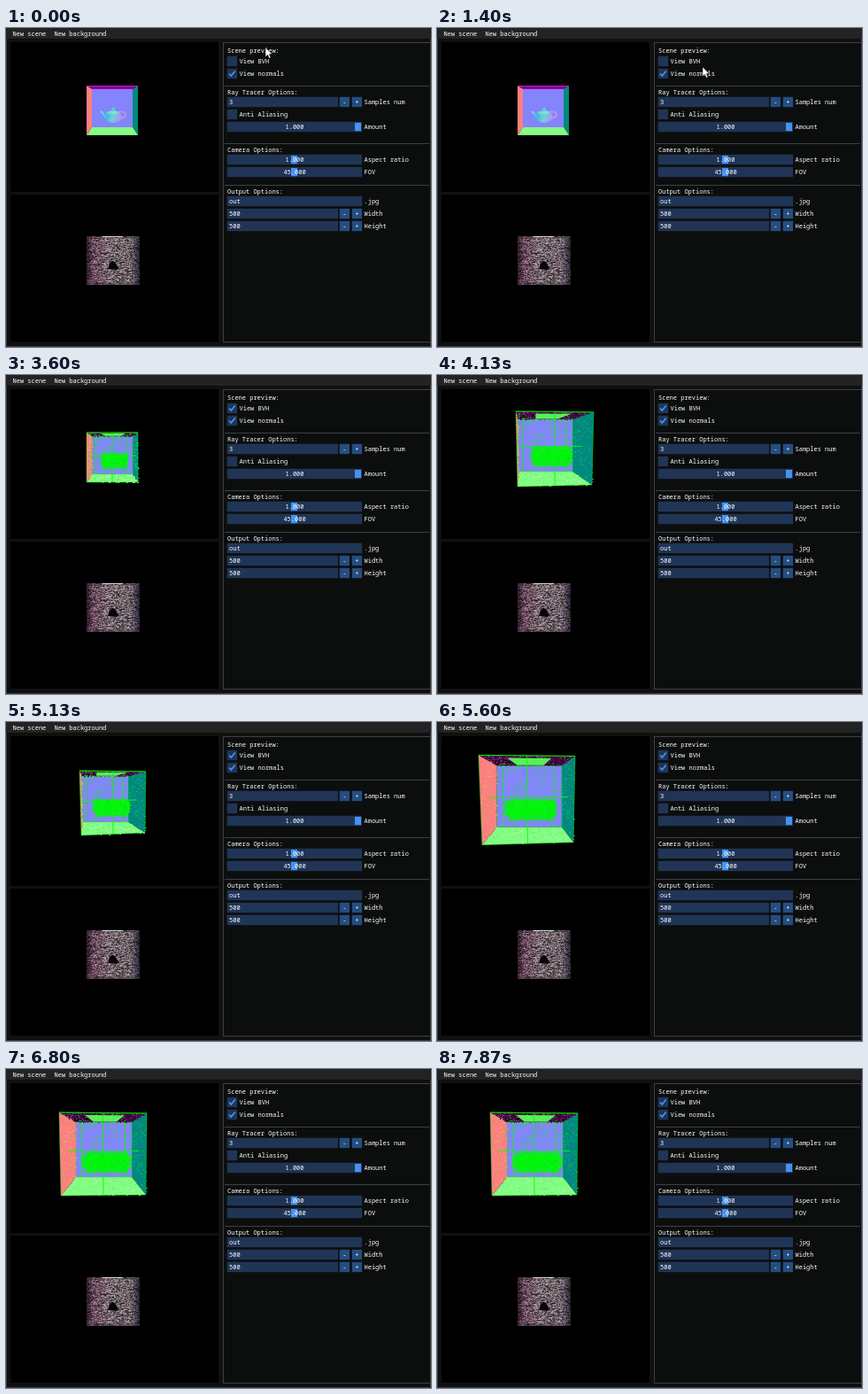
Write an HTML page with a canvas that moves like this. It is 480 by 360 pixels and loops after 8000 ms.

```html
<!DOCTYPE html>
<html>
<head>
<meta charset="utf-8">
<style>
  html, body { margin: 0; width: 100%; height: 100%; overflow: hidden; background: #0f0f0f; }
  canvas, svg { position: absolute; left: 0; top: 0; display: block; }
  text { font: 500 7px "Noto Sans Mono", "DejaVu Sans Mono", monospace; fill: #fff; white-space: pre; }
  .tick { fill: none; stroke: #4296fa; stroke-width: 1.7; }
</style>
</head>
<body>
<canvas id="view" width="480" height="360"></canvas>
<svg id="ui" width="480" height="360" viewBox="0 0 480 360"></svg>
<script>
const LOOP = 8000;
const FIELD = '#203556', BUTTON = '#254d80', GRAB = '#4492f2', ACTIVE = '#3a6fb8', BORDER = '#3e3e46';
const GREEN = '#00ff00';
const ui = document.getElementById('ui');
const ctx = document.getElementById('view').getContext('2d');

// ---------- interface ----------
function add(tag, attrs, content = '') {
  const el = document.createElementNS('http://www.w3.org/2000/svg', tag);
  for (const key in attrs) el.setAttribute(key, attrs[key]);
  el.textContent = content;
  return ui.appendChild(el);
}
const box = (x, y, width, height, fill) => add('rect', { x, y, width, height, fill });
const frame = (x, y, width, height, fill) =>
  add('rect', { x: x + .5, y: y + .5, width: width - 1, height: height - 1, fill, stroke: BORDER });
const field = (x, y, width, fill = FIELD) => box(x - .3, y - .2, width + .4, 11.4, fill);
const label = (x, y, content) => add('text', { x, y }, content);
const tick = y => add('path', { d: `M252 ${y + 5.5}L254.3 ${y + 8}L258.7 ${y + 2.5}`, class: 'tick' });
const separator = y => box(247, y, 231, 1, BORDER);

function checkbox(y, name) {
  label(263.5, y + 8, name);
  return field(250, y, 11);
}
function stepper(y, value, name) {
  field(250, y, 125);
  label(252, y + 8, value);
  [[377, '-'], [391, '+']].forEach(([x, sign]) => {
    field(x, y, 11, BUTTON);
    label(x + 3.2, y + 8, sign);
  });
  label(404.5, y + 8, name);
}
function slider(y, value, name, grabX) {
  field(250, y, 152);
  box(grabX, y + 1, 7, 9.2, GRAB);
  label(326 - value.length * 2.1, y + 8, value);
  label(404.5, y + 8, name);
}

frame(0, 0, 480, 360, 'none');
box(0, 0, 480, 12, '#232323');
label(7.5, 8.5, 'New scene');
label(54.5, 8.5, 'New background');
frame(245, 16, 235, 339, '#0c0e0e');

label(250, 28, 'Scene preview:');
const bvhBox = checkbox(32, 'View BVH');
const bvhTick = tick(32);
checkbox(46, 'View normals');
tick(46);
separator(65);
label(250, 75, 'Ray Tracer Options:');
stepper(78, '3', 'Samples num');
checkbox(92, 'Anti Aliasing');
slider(106, '1.000', 'Amount', 394);
separator(130);
label(250, 139.5, 'Camera Options:');
slider(143, '1.000', 'Aspect ratio', 322);
slider(157, '45.000', 'FOV', 322);
separator(177);
label(250, 186.5, 'Output Options:');
field(250, 190, 152);
label(252, 198, 'out');
label(404.5, 198, '.jpg');
stepper(204, '500', 'Width');
stepper(218, '500', 'Height');
const cursor = add('path', {
  d: 'M0 0V10.5L2.5 8.3L4.3 12.2L6 11.4L4.3 7.6H7.7Z',
  fill: '#fff', stroke: '#111', 'stroke-width': .5
});

// ---------- helpers ----------
function random(seed) {
  return () => {
    seed = seed + 0x6D2B79F5 | 0;
    let n = Math.imul(seed ^ seed >>> 15, 1 | seed);
    n = n + Math.imul(n ^ n >>> 7, 61 | n) ^ n;
    return ((n ^ n >>> 14) >>> 0) / 4294967296;
  };
}
// Rows are [time, ...values]
function sample(rows, t) {
  let i = 0;
  while (i < rows.length - 2 && t >= rows[i + 1][0]) i++;
  const [a, b] = [rows[i], rows[i + 1]];
  const p = Math.min(1, Math.max(0, (t - a[0]) / (b[0] - a[0])));
  const eased = p * p * (3 - 2 * p);
  return a.slice(1).map((v, k) => v + (b[k + 1] - v) * eased);
}
function fill(points, color) {
  ctx.fillStyle = color;
  ctx.beginPath();
  points.forEach(([x, y]) => ctx.lineTo(x, y));
  ctx.closePath();
  ctx.fill();
}
function line(a, b) {
  ctx.beginPath();
  ctx.moveTo(...a);
  ctx.lineTo(...b);
  ctx.stroke();
}
const mix = (a, b, p) => [a[0] + (b[0] - a[0]) * p, a[1] + (b[1] - a[1]) * p];
const inside = ([a, b, c, d], u, v) => mix(mix(a, b, u), mix(d, c, u), v);

function speckle(quad, count, colors, rnd) {
  for (let i = 0; i < count; i++) {
    const [x, y] = inside(quad, rnd(), rnd());
    ctx.fillStyle = colors[i % colors.length];
    ctx.fillRect(Math.round(x), Math.round(y), 1 + (rnd() > .6), 1);
  }
}

// ---------- grainy render ----------
const render = document.createElement('canvas');
render.width = 60;
render.height = 55;
{
  const g = render.getContext('2d'), rnd = random(11);
  for (let y = 0; y < 55; y++) {
    let grain = rnd();
    for (let x = 0; x < 60; x++) {
      grain = grain * .35 + rnd() * .65;
      const edge = Math.min(1, .45 + Math.min(x, 59 - x, y + 5, 58 - y) / 14);
      const base = (15 + grain * 185) * edge;
      const red = Math.max(0, 1 - x / 26), blue = Math.max(0, (x - 46) / 14);
      const tone = k => Math.max(0, base * k + (rnd() - .5) * 18);
      g.fillStyle = `rgb(${tone(1.04 - blue * .2)},${tone(.92 - red * .25 - blue * .15)},${tone(.98 - red * .08)})`;
      g.fillRect(x, y, 1, 1);
    }
  }
  g.fillStyle = '#ddd';
  g.fillRect(18, 0, 23, 1);
  g.fillStyle = '#050505';
  g.beginPath();
  g.moveTo(24, 37);
  g.lineTo(26, 31);
  g.lineTo(29, 28);
  g.lineTo(32, 29);
  g.lineTo(36, 36);
  g.lineTo(34, 38);
  g.fill();
}

// ---------- preview scene ----------
// time, front corners clockwise from top left, back wall box, teapot bounds
const poses = [
  [3600, 91, 65, 149, 65, 149, 121, 91, 121, 97, 69, 143, 112, 107, 88, 137, 107],
  [4130, 89, 41, 177, 42, 175, 124, 91, 126, 91, 50, 153, 109, 106, 81, 153, 105],
  [5130, 83, 55, 158, 56, 157, 125, 85, 128, 85, 61, 138, 113, 98, 87, 140, 108],
  [5650, 46, 37, 156, 38, 154, 136, 50, 139, 67, 49, 141, 119, 76, 87, 135, 113],
  [6000, 54, 44, 154, 45, 152, 137, 57, 139, 74, 55, 140, 120, 81, 91, 134, 116],
  [6800, 60, 49, 159, 50, 158, 142, 62, 143, 79, 60, 142, 122, 86, 94, 141, 119]
];

function teapot() {
  const shade = ctx.createLinearGradient(108, 94, 135, 103);
  ['#70d8e8', '#40b8e8', '#70d0d8', '#a0a0f0', '#f090d0'].forEach((c, i) => shade.addColorStop(i / 4, c));
  ctx.strokeStyle = ctx.fillStyle = shade;
  ctx.lineWidth = 1.6;
  ctx.beginPath();
  ctx.ellipse(130, 98, 5, 3.6, 0, 0, 7);
  ctx.stroke();
  ctx.beginPath();
  ctx.moveTo(107, 94);
  ctx.quadraticCurveTo(110, 96, 113, 102);
  ctx.lineWidth = 2.4;
  ctx.stroke();
  ctx.beginPath();
  ctx.ellipse(121, 100, 9.5, 7, 0, 0, 7);
  ctx.ellipse(121, 92, 2, 2.4, 0, 0, 7);
  ctx.fill();
  ctx.fillStyle = 'rgba(150,255,170,.45)';
  ctx.beginPath();
  ctx.ellipse(120, 95.5, 6.5, 2, 0, 0, 7);
  ctx.fill();
}

function hierarchy(front, back, sides, bounds) {
  const rnd = random(5), [x0, y0, x1, y1] = bounds;
  const width = x1 - x0, height = y1 - y0;
  const middle = front.map((p, i) => mix(p, back[i], .5));

  speckle(sides.ceiling, 330, ['#000', '#b000a8', '#280028', '#80107c', '#10a010'], rnd);
  speckle(sides.left, 130, ['#f0a060', '#d8b468', '#e08878'], rnd);
  speckle(sides.right, 130, ['#00b868', '#20a080', '#1878a0'], rnd);
  speckle(sides.floor, 130, ['#60ff60', '#a8ffa8', '#70f070'], rnd);
  fill([[.27, .25], [.77, .25], [.72, .95], [.32, .95]].map(([u, v]) => inside(sides.ceiling, u, v)), '#58f058');

  ctx.strokeStyle = GREEN;
  ctx.lineWidth = .8;
  ctx.globalAlpha = .45;
  for (let i = 0; i < 26; i++) {
    const u = rnd(), v = rnd(), run = .1 + rnd() * .3;
    line(inside(back, u, v), inside(back, Math.min(1, u + run * .7), Math.max(0, v - run)));
  }
  ctx.globalAlpha = .85;
  ctx.lineWidth = 1;
  line(inside(middle, 0, .49), inside(middle, 1, .49));
  line(inside(front, .5, 0), inside(front, .5, 1));
  [.1, .88].forEach(u => line(inside(back, u, 0), inside(back, u, 1)));
  line(front[0], front[1]);
  ctx.globalAlpha = .4;
  front.forEach((p, i) => line(p, front[(i + 1) % 4]));
  back.forEach((p, i) => line(p, back[(i + 1) % 4]));

  ctx.globalAlpha = .88;
  ctx.fillStyle = '#00f808';
  ctx.fillRect(x0 + width * .08, y0, width * .86, height * .92);
  ctx.fillRect(x0, y0 + height * .12, width, height * .62);
  ctx.globalAlpha = 1;
  speckle([[x0, y0], [x1, y0], [x1, y1], [x0, y1]], 130, [GREEN, '#08d828', '#00f000', '#30e040'], rnd);
}

function scene(t, bvh) {
  const p = sample(poses, t);
  const front = [0, 2, 4, 6].map(i => [p[i], p[i + 1]]);
  const [l, top, r, b] = p.slice(8, 12);
  const back = [[l, top], [r, top], [r, b], [l, b]];
  const sides = {
    ceiling: [front[0], front[1], back[1], back[0]],
    right: [back[1], front[1], front[2], back[2]],
    floor: [back[3], back[2], front[2], front[3]],
    left: [front[0], back[0], back[3], front[3]]
  };
  fill(back, '#8484fc');
  fill(sides.ceiling, bvh ? '#400040' : '#8a0098');
  fill(sides.right, '#008a7c');
  fill(sides.floor, '#84fc84');
  fill(sides.left, '#fc8080');
  if (bvh) hierarchy(front, back, sides, p.slice(12));
  else {
    ctx.fillStyle = '#d010d8';
    ctx.fillRect(91, 65, 58, 1);
    teapot();
  }
}

// ---------- playback ----------
const cursorPath = [
  [70, 293, 22], [470, 300, 44], [1400, 300, 44], [2130, 258, 41],
  [2530, 258, 41], [3070, 150, 100]
];

function draw() {
  const t = performance.now() % LOOP;
  const bvh = t >= 2530;

  ctx.fillStyle = '#101010';
  ctx.fillRect(0, 0, 480, 360);
  ctx.fillStyle = '#000';
  ctx.fillRect(5, 16, 235, 169);
  ctx.fillRect(5, 188, 235, 166);
  scene(t, bvh);
  ctx.drawImage(render, 91, 235);

  bvhBox.setAttribute('fill', t >= 2130 && t < 2600 ? ACTIVE : FIELD);
  bvhTick.style.display = bvh ? '' : 'none';
  cursor.style.display = t < 3600 ? '' : 'none';
  cursor.setAttribute('transform', `translate(${sample(cursorPath, t).join(' ')})`);
  requestAnimationFrame(draw);
}
draw();
</script>
</body>
</html>
```
